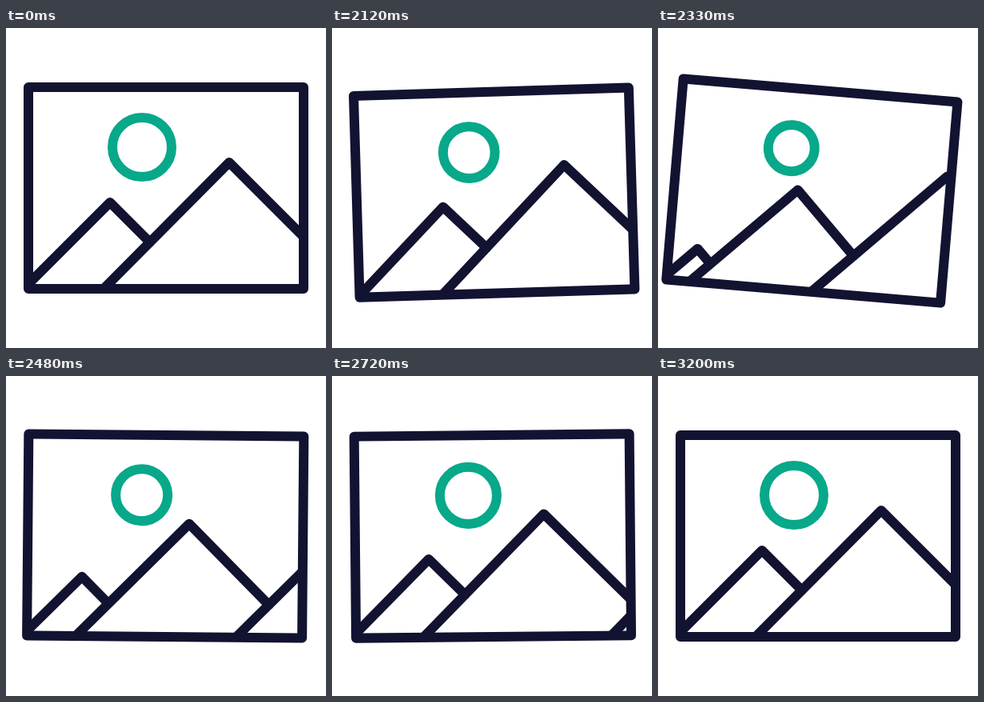
An HTML page that plays this animation: 400 px wide and 400 px high, repeating every 3230 ms.

```html
<!DOCTYPE html>
<html lang="en">
<head>
<meta charset="utf-8">
<title>Swaying picture</title>
<style>
  html, body { margin: 0; width: 100%; height: 100%; overflow: hidden; background: #fff; }
  svg { display: block; width: 100%; height: 100%; }
  svg * { fill: none; stroke: #121331; stroke-width: 12; stroke-linecap: round; stroke-linejoin: round; }
  #sun { stroke: #08a88a; }
</style>
</head>
<body>
<svg viewBox="0 0 400 400">
  <defs>
    <clipPath id="inside"><rect x="28" y="74" width="344" height="252"/></clipPath>
  </defs>
  <g id="picture">
    <circle id="sun" cx="170" cy="149" r="37"/>
    <g clip-path="url(#inside)"><path id="hills"/></g>
    <rect x="28" y="74" width="344" height="252"/>
  </g>
</svg>
<script>
const LOOP = 3230, START = 2030, STEP = 30, GROUND = 326;

// Smooth curve through [time, value] points, flat at turning points and ends.
function track(points) {
  const last = points.length - 1;
  const slope = i => (points[i + 1][1] - points[i][1]) / (points[i + 1][0] - points[i][0]);
  const tangent = points.map((_, i) => {
    if (i === 0 || i === last) return 0;
    const a = slope(i - 1), b = slope(i);
    return a * b <= 0 ? 0 : 2 * a * b / (a + b);
  });
  return t => {
    if (t <= points[0][0]) return points[0][1];
    if (t >= points[last][0]) return points[last][1];
    const i = points.findIndex(p => p[0] > t) - 1;
    const [t0, v0] = points[i], [t1, v1] = points[i + 1];
    const h = t1 - t0, u = (t - t0) / h, w = 1 - u;
    return v0 * (1 + 2 * u) * w * w + v1 * u * u * (3 - 2 * u)
      + h * u * w * (tangent[i] * w - tangent[i + 1] * u);
  };
}

const angle = track([[2000, 0], [2090, -2.1], [2305, 5], [2597, -1.95], [2854, 1.05], [3180, 0]]);
const drop = track([[2000, 0], [2200, 8.8], [2440, 0]]);
const radius = track([[2000, 37], [2210, 28.6], [2265, 28], [2330, 29], [2480, 32.5], [2720, 35.6], [3140, 37]]);
const travel = track([[2000, 0], [2210, 0.1], [2330, 0.351], [2480, 0.669], [2720, 0.9], [3140, 1]]);

const picture = document.getElementById('picture');
const sun = document.getElementById('sun');
const hills = document.getElementById('hills');
const mix = (a, b, u) => a + (b - a) * u;

// A hill runs from its foot to its peak, then down to the slope of the next hill.
function hill(foot, x, y, nextFoot) {
  const d = (GROUND - y - x + nextFoot) / 2;
  return `M${foot} ${GROUND}L${x} ${y}L${x + d} ${y + d}`;
}

function draw(time) {
  const t = time < START ? 0 : START + Math.floor((time - START) / STEP) * STEP;
  const s = travel(t);
  const midFoot = mix(22, 122, s), farFoot = mix(122, 372, s);

  picture.setAttribute('transform', `translate(0 ${drop(t)}) rotate(${angle(t)} 200 110)`);
  sun.setAttribute('r', radius(t));
  hills.setAttribute('d',
    (s > 0 ? hill(22, mix(28, 130, s), mix(320, 218, s), midFoot) : '') +
    hill(midFoot, mix(130, 279, s), mix(218, 168, s), farFoot) +
    hill(farFoot, mix(279, 529, s), 168, 622));
}

const begin = performance.now();
function tick() {
  draw((performance.now() - begin) % LOOP);
  requestAnimationFrame(tick);
}
tick();
</script>
</body>
</html>
```
